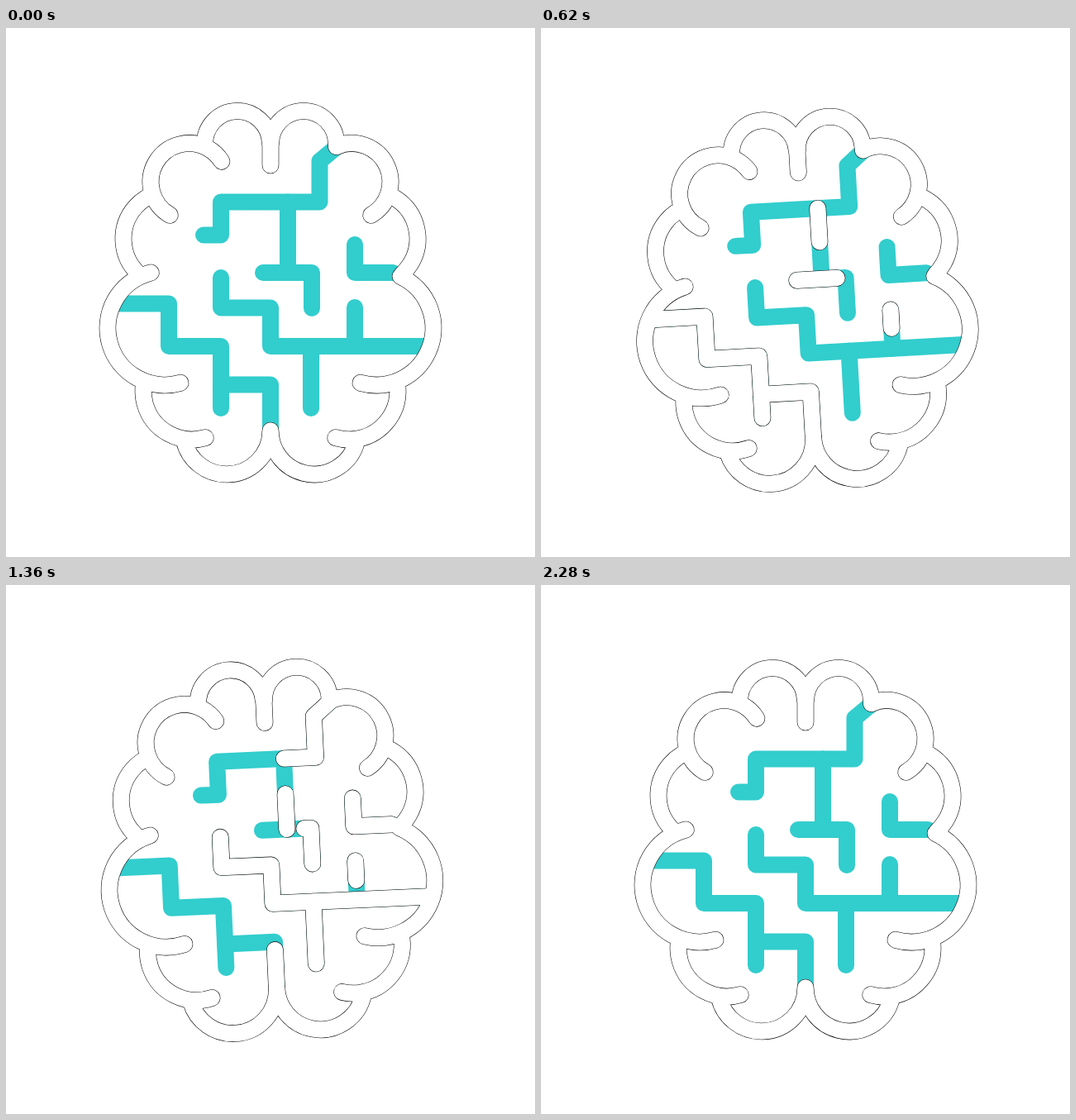
Recreate the animation shown at these times as an HTML page with a canvas. Size 640x640 px, loop 2.4 s.

```html
<!DOCTYPE html>
<html lang="en">
<head>
<meta charset="utf-8">
<title>Brain maze</title>
<style>
  html, body { margin: 0; width: 100%; height: 100%; overflow: hidden; background: #fff; }
  canvas { display: block; }
</style>
</head>
<body>
<canvas id="stage" width="640" height="640"></canvas>
<script>
const ctx = document.getElementById('stage').getContext('2d');
const SIZE = 640, MID = SIZE / 2;
const LOOP = 2400, STEP = 20, LAST = 2280;
const TEAL = '#32cdcd', WIDTH = 20, HAIRLINE = 0.55;

const rad = deg => deg * Math.PI / 180;

function ease(t, start, duration) {
  const u = Math.min(1, Math.max(0, (t - start) / duration));
  return (1 - Math.cos(Math.PI * u)) / 2;
}

// Eased motion through [time, value] keys
function valueAt(keys, t) {
  return keys.slice(1).reduce((value, [time, next], i) => {
    const [before, last] = keys[i];
    return value + (next - last) * ease(t, before, time - before);
  }, keys[0][1]);
}

const tilt = t => valueAt([[0, 0], [460, -15.9], [800, 12], [1300, -3], [1620, 2], [LAST, 0]], t);
const height = t => valueAt([[0, MID], [455, 355], [800, 298.5], [1120, 367], [1440, 312.4], [1890, 328.5], [LAST, MID]], t);

// Each lobe is an arc, mirrored to the right half, where its fold may be shorter
function buildBrain() {
  const brain = new Path2D();
  const arc = (x, y, r, from, to) => {
    brain.moveTo(x + r * Math.cos(rad(from)), y + r * Math.sin(rad(from)));
    brain.arc(x, y, r, rad(from), rad(to));
  };
  const lobe = (x, y, r, from, to, rightTo = to) => {
    arc(x, y, r, from, to);
    arc(SIZE - x, y, r, 180 - rightTo, 180 - from);
  };
  lobe(280, 140, 39.5, 178, 360);
  lobe(221.5, 186, 46.5, 120, 328, 294);
  lobe(200, 255, 58, 132, 238);
  lobe(192, 363, 69, 74, 256, 245);
  lobe(225, 439, 59, 74, 184);
  lobe(267, 487, 53, 0, 166);
  brain.moveTo(MID, 138);
  brain.lineTo(MID, 166);
  return brain;
}

// Points of a right-angled route: moves alternate across and down
function route(x, y, ...moves) {
  const pts = [[x, y]];
  moves.forEach((d, i) => {
    if (i % 2) y += d; else x += d;
    if (d) pts.push([x, y]);
  });
  return pts;
}

const distance = (a, b) => Math.hypot(b[0] - a[0], b[1] - a[1]);
const lengthOf = pts => pts.slice(1).reduce((sum, p, i) => sum + distance(pts[i], p), 0);

// White runs along the path from its first point, then runs out or draws back
function path(pts, grow, leave, exit) {
  const total = lengthOf(pts);
  return { pts, total, grow, leave, exit, duration: total < 120 ? 320 : 430 };
}

const paths = [
  path(route(131, 333.5, 66, 51.5, 63, 75), 20, 743, 'back'),
  path(route(MID, 488, 0, -56.5, -60), 300, 1180, 'back'),
  path(route(341, 210.5, 0, 85.5), 465, 1200, 'through'),
  path(route(311, 296, 59, 43), 465, 1200, 'through'),
  path(route(260, 302, 0, 36.5, 60, 46.5, 192), 641, 1381, 'through'),
  path(route(422, 338, 0, 47), 465, 1200, 'back'),
  path(route(369, 460, 0, -75), 800, 1620, 'back'),
  path(route(468, 296, -46, -34), 960, 1620, 'back'),
  path([[400, 144], ...route(379.5, 161, 0, 49.5, -119.5, 40, -21)], 1160, 1815, 'through')
];

function polyline(pts) {
  const line = new Path2D();
  pts.forEach(p => line.lineTo(...p));
  return line;
}

// The part of a polyline between two distances along it
function slice(pts, start, end) {
  const out = [];
  let walked = 0;
  pts.slice(1).forEach((q, i) => {
    const p = pts[i], len = distance(p, q);
    const at = d => p.map((v, k) => v + (q[k] - v) * (d - walked) / len);
    const a = Math.max(start, walked), b = Math.min(end, walked + len);
    if (b > a) out.push(at(a), at(b));
    walked += len;
  });
  return out;
}

function whitePart({ pts, total, grow, leave, exit, duration }, t) {
  const grown = total * ease(t, grow, duration);
  const left = total * ease(t, leave, duration);
  return exit === 'through' ? slice(pts, left, grown) : slice(pts, 0, grown - left);
}

const brain = buildBrain();
const maze = paths.map(p => polyline(p.pts));

function strokeAll(shapes, color, width) {
  ctx.strokeStyle = color;
  ctx.lineWidth = width;
  shapes.forEach(shape => ctx.stroke(shape));
}

function draw(t) {
  ctx.setTransform(1, 0, 0, 1, 0, 0);
  ctx.fillStyle = '#fff';
  ctx.fillRect(0, 0, SIZE, SIZE);
  ctx.translate(MID, height(t));
  ctx.rotate(rad(tilt(t)));
  ctx.translate(-MID, -MID);
  ctx.lineCap = ctx.lineJoin = 'round';

  const parts = paths.map(p => whitePart(p, t)).filter(part => part.length);
  const white = [brain, ...parts.map(polyline)];

  strokeAll(maze, TEAL, WIDTH);
  strokeAll(white, '#000', WIDTH + HAIRLINE);
  strokeAll(white, '#fff', WIDTH - HAIRLINE);
}

function tick() {
  const t = performance.now() % LOOP;
  draw(Math.min(LAST, Math.floor(t / STEP) * STEP));
  requestAnimationFrame(tick);
}
tick();
</script>
</body>
</html>
```
